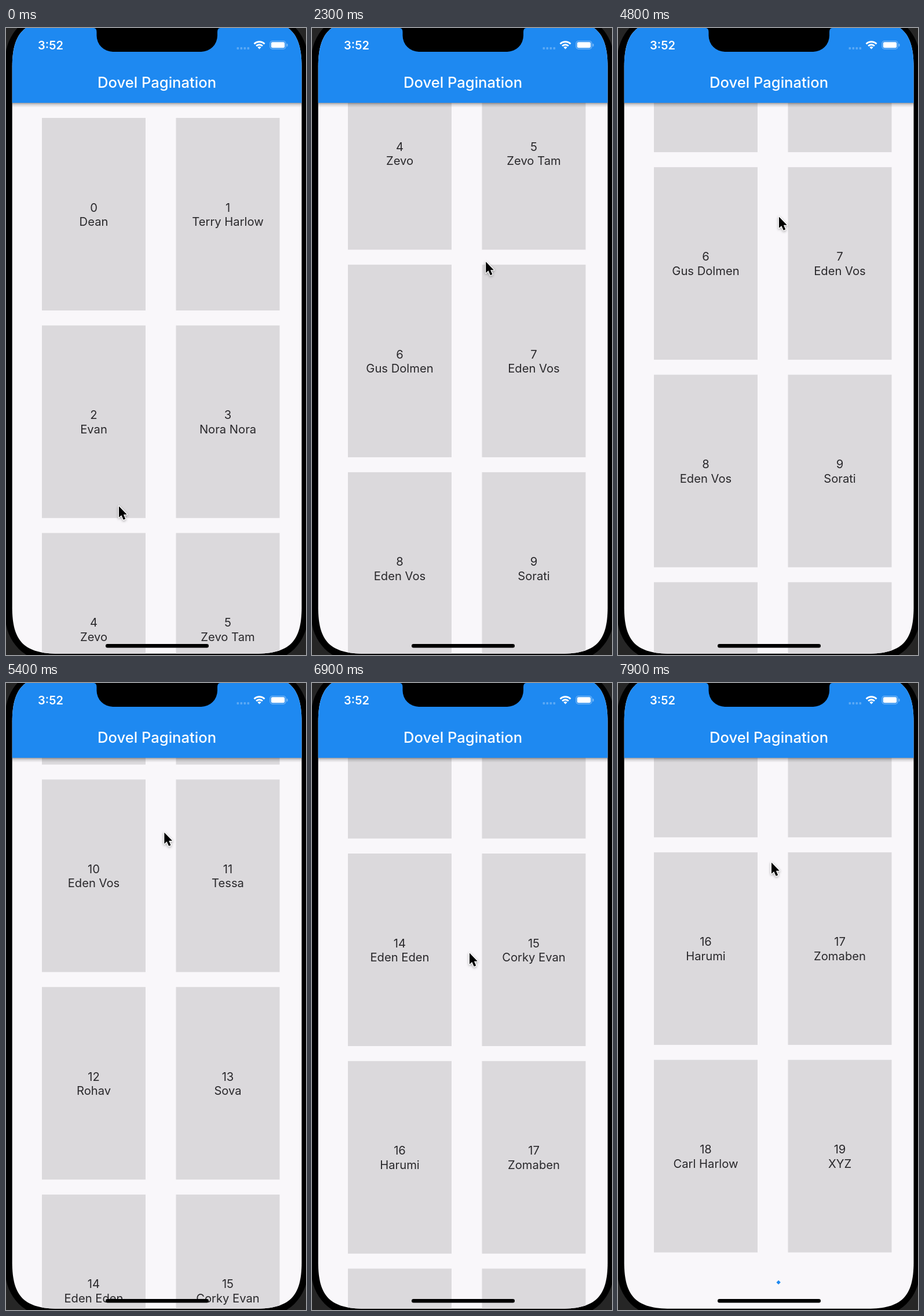
Write an HTML page with a canvas that moves like this. It is 518 px wide and 1081 px high and loops after 8000 ms.

```html
<!DOCTYPE html>
<html lang="en">
<head>
<meta charset="utf-8">
<title>Pagination list</title>
<style>
  html, body { margin: 0; width: 100%; height: 100%; overflow: hidden; background: #000; }
  canvas { display: block; width: 518px; height: 1081px; }
</style>
</head>
<body>
<canvas id="stage"></canvas>
<script>
const W = 518, H = 1081, LOOP = 8000, STEP = 100;
const BLUE = '#1e89f1', PAGE = '#f9f7fa', CARD = '#dbd9dc', INK = '#29282b';
const FONT = 'Inter, "Liberation Sans", sans-serif';
const ROW = 357.8, CARD_W = 179, CARD_H = 332, FIRST = 155;
const COLS = [62, 293.5];
const NAMES = [
  'Dean', 'Terry Harlow', 'Evan', 'Nora Nora', 'Zevo', 'Zevo Tam',
  'Gus Dolmen', 'Eden Vos', 'Eden Vos', 'Sorati', 'Eden Vos', 'Tessa',
  'Rohav', 'Sova', 'Eden Eden', 'Corky Evan', 'Harumi', 'Zomaben',
  'Carl Harlow', 'XYZ'
];

// Scroll limit for a number of loaded rows
const bottom = rows => ROW * rows - 852.5;
const LOADS = [
  { rows: 5, from: 2600, to: 4400, phase: 2528 },
  { rows: 10, from: 7500, to: LOOP, phase: 2610 }
];

// Resting points of the hand and the list
const STOPS = [
  { t: 0, scroll: 0, x: 194, y: 823 },
  { t: 1700, scroll: 0, x: 216, y: 906 },
  { t: 2700, scroll: bottom(5), x: 311, y: 330 },
  { t: 4300, scroll: bottom(5), x: 311, y: 330 },
  { t: 4800, scroll: 988.5, x: 277, y: 324 },
  { t: 6000, scroll: 2006, x: 271, y: 456 },
  { t: 6900, scroll: 2365.6, x: 271, y: 464 },
  { t: 7300, scroll: bottom(10), x: 264, y: 308 },
  { t: LOOP, scroll: bottom(10), x: 264, y: 308 }
];

const canvas = document.getElementById('stage');
const g = canvas.getContext('2d');
const ratio = window.devicePixelRatio || 1;
canvas.width = Math.round(W * ratio);
canvas.height = Math.round(H * ratio);

// cubic-bezier(.4, 0, .2, 1)
function ease(x) {
  if (x <= 0) return 0;
  if (x >= 1) return 1;
  let lo = 0, hi = 1;
  for (let i = 0; i < 24; i++) {
    const m = (lo + hi) / 2, n = 1 - m;
    if (1.2 * n * n * m + 0.6 * n * m * m + m * m * m < x) lo = m; else hi = m;
  }
  return lo * lo * (3 - 2 * lo);
}

function pose(t) {
  const i = STOPS.findIndex(s => s.t > t);
  const a = STOPS[i - 1], b = STOPS[i];
  const u = (t - a.t) / (b.t - a.t), e = ease(u);
  const mix = k => a[k] + (b[k] - a[k]) * e;
  // A swipe that ends lower pulls up first, then returns
  const lift = b.scroll > a.scroll && b.y > a.y ? 170 * Math.sin(Math.PI * u) ** 2 : 0;
  return { scroll: mix('scroll'), x: mix('x'), y: mix('y') - lift };
}

function box(x, y, w, h, r, color) {
  g.beginPath();
  g.roundRect(x, y, w, h, r);
  g.fillStyle = color;
  g.fill();
}

function label(text, x, y, size, weight, color) {
  g.font = `${weight} ${size}px ${FONT}`;
  g.textAlign = 'center';
  g.fillStyle = color;
  g.fillText(text, x, y);
}

// Rectangle with smooth, continuous corners
function screenPath(l, t, r, b) {
  const e = 80, c = 21;
  g.beginPath();
  g.moveTo(l, t + e);
  g.bezierCurveTo(l, t + c, l + c, t, l + e, t);
  g.lineTo(r - e, t);
  g.bezierCurveTo(r - c, t, r, t + c, r, t + e);
  g.lineTo(r, b - e);
  g.bezierCurveTo(r, b - c, r - c, b, r - e, b);
  g.lineTo(l + e, b);
  g.bezierCurveTo(l + c, b, l, b - c, l, b - e);
  g.closePath();
}

function cards(scroll, rows) {
  for (let i = 0; i < rows * 2; i++) {
    const y = FIRST + ROW * (i >> 1) - scroll;
    if (y > H || y + CARD_H < 120) continue;
    const x = COLS[i % 2], mid = x + CARD_W / 2;
    g.fillStyle = CARD;
    g.fillRect(x, y, CARD_W, CARD_H);
    label(String(i), mid, y + 161.5, 20.2, 400, INK);
    label(NAMES[i], mid, y + 186, 20.2, 400, INK);
  }
}

function spinner(age, y) {
  const p = age / 1333 % 1;
  const head = ease(p * 2), tail = ease(p * 2 - 1);
  const start = Math.PI * (-0.5 + 1.5 * tail + 2 * (age / 2222 % 1) + 0.5 * p);
  const sweep = Math.max(1.5 * Math.PI * (head - tail), 0.001);
  g.beginPath();
  g.arc(260.5, y, 23.1, start, start + sweep);
  g.lineWidth = 5.1;
  g.lineCap = 'square';
  g.strokeStyle = BLUE;
  g.stroke();
}

function wifi(x, y) {
  g.lineCap = 'butt';
  g.strokeStyle = g.fillStyle = '#fff';
  g.lineWidth = 3;
  for (const r of [7.6, 12.6]) {
    g.beginPath();
    g.arc(x, y, r, -Math.PI * 0.75, -Math.PI * 0.25);
    g.stroke();
  }
  g.beginPath();
  g.moveTo(x, y);
  g.arc(x, y, 4.4, -Math.PI * 0.75, -Math.PI * 0.25);
  g.fill();
}

function header() {
  const shade = g.createLinearGradient(0, 129, 0, 137);
  shade.addColorStop(0, 'rgba(0,0,0,.36)');
  shade.addColorStop(0.4, 'rgba(0,0,0,.14)');
  shade.addColorStop(1, 'rgba(0,0,0,0)');
  g.fillStyle = shade;
  g.fillRect(0, 129, W, 8);
  g.fillStyle = BLUE;
  g.fillRect(0, 0, W, 129);
  label('Dovel Pagination', 260.5, 102.5, 25.6, 500, '#fff');

  label('3:52', 77, 36.7, 20, 600, '#fff');
  for (let i = 0; i < 4; i++) box(398.5 + i * 6, 33, 3.6, 4, 1, '#5ba9f5');
  wifi(437.5, 36.4);
  g.beginPath();
  g.roundRect(456, 22.5, 27, 13.6, 4);
  g.lineWidth = 1.2;
  g.strokeStyle = '#7fbcf7';
  g.stroke();
  box(457.8, 24.3, 23.4, 10, 2.4, '#fff');
  box(484.6, 27, 1.8, 4.8, 1, '#7fbcf7');
}

function notch() {
  const l = 156.5, r = 365, b = 41, round = 28;
  g.beginPath();
  g.moveTo(l - 5, 0);
  g.quadraticCurveTo(l, 0, l, 7);
  g.arcTo(l, b, l + round, b, round);
  g.arcTo(r, b, r, b - round, round);
  g.lineTo(r, 7);
  g.quadraticCurveTo(r, 0, r + 5, 0);
  g.fillStyle = '#000';
  g.fill();
}

function pointer(x, y) {
  g.save();
  g.translate(x + 1, y + 1.5);
  g.scale(0.86, 0.86);
  g.beginPath();
  [[0, 0], [0, 22.5], [5, 17.9], [9, 27], [13, 25.3], [9.2, 16.5], [16, 16.5]]
    .forEach(([px, py]) => g.lineTo(px, py));
  g.closePath();
  g.shadowColor = 'rgba(0,0,0,.35)';
  g.shadowBlur = 4 * ratio;
  g.shadowOffsetY = 1.5 * ratio;
  g.lineJoin = 'round';
  g.lineWidth = 3;
  g.strokeStyle = '#fff';
  g.stroke();
  g.shadowColor = 'transparent';
  g.fillStyle = '#000';
  g.fill();
  g.restore();
}

function draw(t) {
  const { scroll, x, y } = pose(t);
  const { rows, from, to, phase } = LOADS.find(load => t < load.to);

  g.setTransform(ratio, 0, 0, ratio, 0, 0);
  g.fillStyle = '#262626';
  g.fillRect(0, 0, W, H);
  box(-1, -25, 522, 1118, 78, '#000');

  g.save();
  screenPath(10.7, -13, 510.5, 1078.7);
  g.clip();
  g.fillStyle = PAGE;
  g.fillRect(0, 0, W, H);
  cards(scroll, rows);
  if (t >= from) spinner(t - phase, FIRST + ROW * (rows - 1) + CARD_H + 35.6 - scroll);
  header();
  g.restore();

  notch();
  box(172, 1062, 178, 6.4, 3.2, '#000');
  pointer(x, y);
}

const begin = performance.now();
function tick() {
  const t = (performance.now() - begin) % LOOP;
  draw(Math.floor(t / STEP) * STEP);
  requestAnimationFrame(tick);
}
tick();
</script>
</body>
</html>
```
